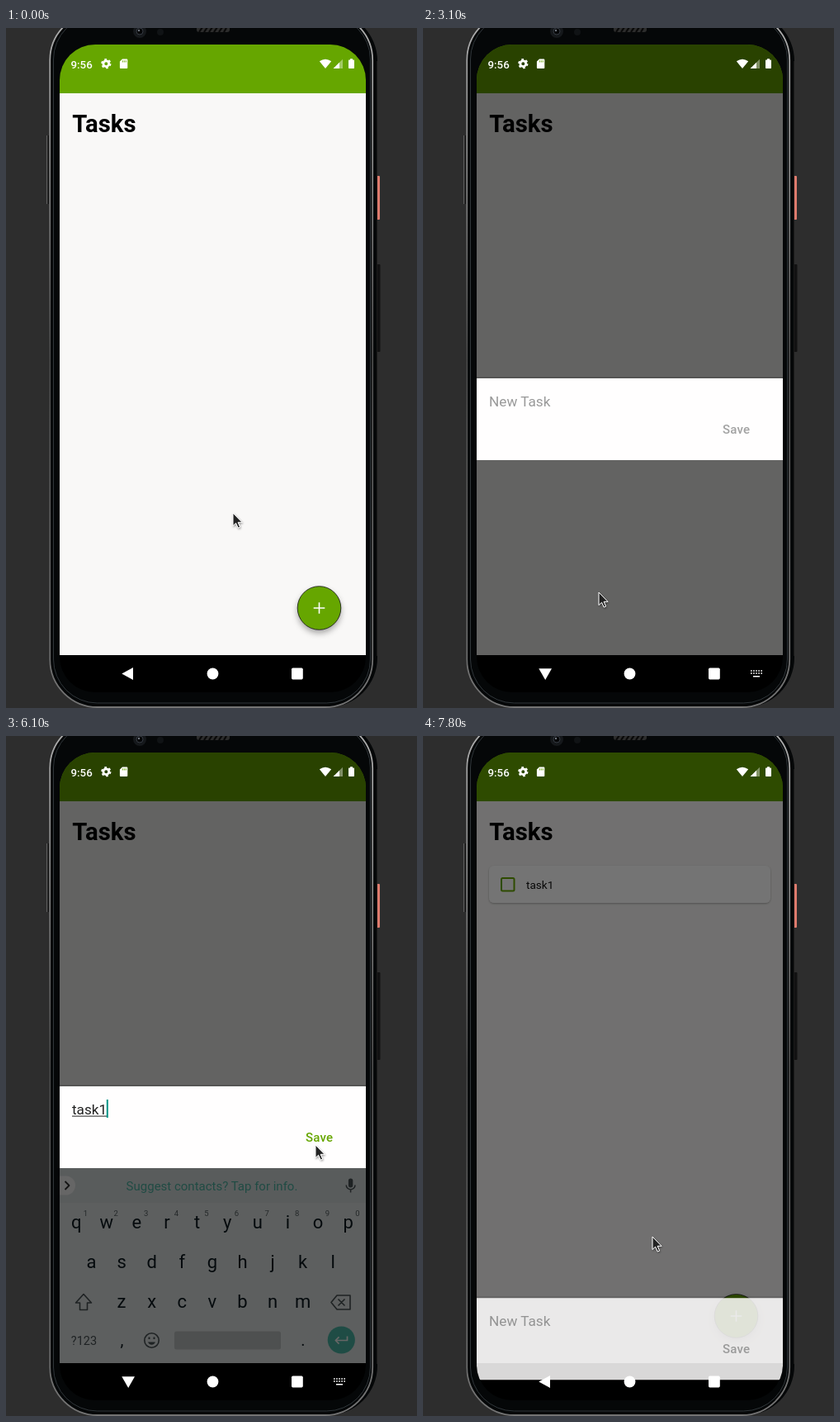
These frames come from a looping animation (498x823 px, 8000 ms). An HTML page:

```html
<!DOCTYPE html>
<html lang="en">
<head>
<meta charset="utf-8">
<title>Task list</title>
<style>
html, body { margin: 0; width: 100%; height: 100%; overflow: hidden; background: #2d2d2d; }
svg { display: block; width: 100%; height: 100%; font-family: Roboto, sans-serif; }
.mid { text-anchor: middle; }
.line { fill: none; stroke-linejoin: round; }
</style>
</head>
<body>
<svg viewBox="0 0 498 823" xmlns="http://www.w3.org/2000/svg">
  <defs>
    <clipPath id="screenClip"><rect x="65" y="20" width="371" height="784" rx="43"/></clipPath>
    <clipPath id="chipClip"><rect x="65" y="523" width="371" height="236"/></clipPath>
    <linearGradient id="metal" x1="0" y1="0" x2="0" y2="1">
      <stop offset="0" stop-color="#b0b0b0"/><stop offset=".25" stop-color="#808080"/>
      <stop offset=".5" stop-color="#4c4c4c"/><stop offset="1" stop-color="#747474"/>
    </linearGradient>
    <filter id="fabShadow" x="-30%" y="-30%" width="160%" height="170%">
      <feDropShadow dx="0" dy="4" stdDeviation="3.5" flood-opacity=".32"/>
    </filter>
    <filter id="cardShadow" x="-5%" y="-20%" width="110%" height="150%">
      <feDropShadow dx="0" dy="1" stdDeviation="1.3" flood-opacity=".3"/>
    </filter>
    <filter id="cursorShadow" x="-40%" y="-30%" width="200%" height="180%">
      <feDropShadow dx=".7" dy="1.3" stdDeviation=".9" flood-opacity=".4"/>
    </filter>
  </defs>

  <!-- Phone body -->
  <rect x="49" y="130" width="3" height="83" fill="#151515"/>
  <path d="M49.7 130V213" stroke="#707070"/>
  <rect x="449" y="179" width="4" height="53" rx="1" fill="#de7b6d"/>
  <rect x="449" y="286" width="4.5" height="106" rx="1" fill="#121212"/>
  <rect x="52" y="-20" width="398" height="842" rx="60" fill="#050708"/>
  <rect x="53.2" y="-19" width="391" height="841" rx="58" fill="none" stroke="url(#metal)" stroke-width="1.8"/>
  <rect x="57.5" y="-15" width="384" height="832" rx="53" fill="none" stroke="#30363a"/>
  <rect x="449" y="40" width="1" height="720" fill="#1b1b1b"/>
  <circle cx="162" cy="4" r="8" fill="#15181b"/><circle cx="162" cy="4" r="4" fill="#050607" stroke="#353a42"/>
  <circle cx="161" cy="3" r="1.2" fill="#717780"/><circle cx="187" cy="5" r="4" fill="#101315"/>
  <rect x="231" y="-3" width="40" height="8" rx="3" fill="#2c2c2c"/>
  <path d="M234 5l4-6m2 6l4-6m2 6l4-6m2 6l4-6m2 6l4-6m2 6l3-5" stroke="#090909" stroke-width="2.2"/>

  <g clip-path="url(#screenClip)">
    <rect x="65" y="20" width="371" height="784"/>
    <rect x="65" y="79" width="371" height="680" fill="#f9f8f7"/>
    <rect x="65" y="20" width="371" height="59" fill="#66a600"/>
    <text x="80.3" y="126" font-size="29.3" font-weight="700">Tasks</text>
    <g id="card">
      <rect x="80" y="157" width="341" height="45" rx="6" fill="#fff" filter="url(#cardShadow)"/>
      <rect x="95" y="172" width="15.5" height="15.5" rx="1.5" fill="none" stroke="#66a600" stroke-width="2"/>
      <text x="125" y="185" font-size="13.6" fill="#111">task1</text>
    </g>
    <g id="fab">
      <circle cx="379.5" cy="702" r="26.3" fill="#66a600" stroke="#111" stroke-width=".8" filter="url(#fabShadow)"/>
      <circle id="ripple" cx="379.5" cy="702" r="26" fill="#000"/>
      <path d="M372.7 702h13.6M379.5 695.2v13.6" stroke="#fff" stroke-width="1.6"/>
    </g>
    <rect id="scrim" x="65" y="20" width="371" height="739"/>

    <g id="sheet">
      <rect x="65" y="-2" width="371" height="2" fill="#000" opacity=".14"/>
      <rect x="65" width="371" height="99" fill="#fffefe"/>
      <text id="entry" x="80" y="33.7" font-size="17.2"></text>
      <rect id="underline" x="80" y="35.6" height="1" fill="#222"/>
      <rect id="caret" y="16" width="2" height="22" fill="#009688"/>
      <text id="save" class="mid" x="379.6" y="67.2" font-size="15" font-weight="500" letter-spacing=".2">Save</text>
    </g>

    <g id="keyboard" clip-path="url(#chipClip)">
      <rect x="65" y="523" width="371" height="236" fill="#e9eeee"/>
      <rect x="65" y="523" width="371" height="42" fill="#e0e6e7"/>
      <rect x="50" y="532.5" width="34" height="23" rx="11.5" fill="#fff"/>
      <path class="line" d="M71.5 539l5 5-5 5" stroke="#333" stroke-width="1.8"/>
      <text class="mid" x="249.5" y="549.7" font-size="15" fill="#4fbca9">Suggest contacts? Tap for info.</text>
      <rect x="414.9" y="535.5" width="5.4" height="11" rx="2.7" fill="#4c5558"/>
      <path class="line" d="M412.2 543.5a5.4 5.4 0 0 0 10.8 0M417.6 549v3.5" stroke="#4c5558" stroke-width="1.5"/>
      <g id="keys" class="mid" fill="#0c1a20"></g>
      <g class="line" stroke="#4c5558" stroke-width="1.6">
        <path d="M94 675.5L84.5 686h5v8.5h9V686h5z"/>
        <path d="M401 677h16v17h-16l-7-8.5zM402.5 681.5l8 8m0-8l-8 8"/>
        <circle cx="176.5" cy="731.5" r="8.7"/>
        <path d="M172 733.5a4.8 4.8 0 0 0 9 0z" fill="#4c5558" stroke="none"/>
        <path d="M173.5 727.5v2.6m6-2.6v2.6" stroke-width="2"/>
      </g>
      <rect x="204" y="720.5" width="129" height="22" rx="2.5" fill="#c5c9ca"/>
      <circle cx="406.3" cy="731" r="16.6" fill="#4fbfac"/>
      <path class="line" d="M413.5 726.5v5h-14m4-4.2l-4.2 4.2 4.2 4.2" stroke="#fff" stroke-width="1.7"/>
      <rect id="keyDim" x="65" y="523" width="371" height="236"/>
    </g>

    <!-- Status bar -->
    <g fill="#fff">
      <text x="78.5" y="48.6" font-size="13.3" font-weight="500">9:56</text>
      <circle cx="121.3" cy="43.2" r="3.4" fill="none" stroke="#fff" stroke-width="2.8"/>
      <circle cx="121.3" cy="43.2" r="5.2" fill="none" stroke="#fff" stroke-width="1.9" stroke-dasharray="2.7 2.745"/>
      <path d="M141 37.5h5.4a.9.9 0 0 1 .9.9v9.7a.9.9 0 0 1-.9.9h-7.6a.9.9 0 0 1-.9-.9v-7.6z"/>
      <path d="M141.3 39.3v2.2m2 -2.2v2.2m2-2.2v2.2" stroke="#66a600" stroke-width=".9"/>
      <path d="M379.8 40.2q7.2-5 14.4 0L387 49z"/>
      <path d="M408 37.7V49h-11.4z" opacity=".4"/>
      <path d="M404 41.7V49h-7.4z"/>
      <path d="M417 37.2h3v1.3h1.2a.8.8 0 0 1 .8.8v9a.8.8 0 0 1-.8.8h-5.4a.8.8 0 0 1-.8-.8v-9a.8.8 0 0 1 .8-.8h1.2z"/>
    </g>

    <!-- Navigation bar -->
    <g fill="#fff">
      <path id="back" d="M140.3 781.5L154 774v15z"/>
      <circle cx="250.5" cy="781.5" r="6.9"/>
      <rect x="346" y="774.6" width="13.8" height="13.8" rx="1.6"/>
      <g id="down">
        <path d="M140.3 775.3h15.7l-7.8 13.6z"/>
        <path d="M397 778h14M397 781h14" stroke="#fff" stroke-width="1.7" stroke-dasharray="1.7 1.38"/>
        <path d="M400 784.7h8" stroke="#fff" stroke-width="1.6"/>
      </g>
    </g>
  </g>
  <path id="cursor" d="M0 0V15.5L3.6 12.2 6.2 18 8.6 17 6.1 11.3H11z" fill="#222" stroke="#fff" stroke-width="1" filter="url(#cursorShadow)"/>
</svg>
<script>
const LOOP = 8000, STEP = 100;
const el = Object.fromEntries([...document.querySelectorAll('[id]')].map(n => [n.id, n]));

// Tracks are lists of [time, ...values], joined by straight lines.
const mouse = [
  [0, 275, 587], [300, 325, 634], [500, 382, 694], [600, 391, 702],
  [2000, 391, 702], [2200, 310, 688], [2400, 220, 673], [2500, 220, 673], [2700, 213, 683],
  [5100, 213, 683], [5300, 300, 729], [5400, 380, 715], [5500, 421, 650],
  [5600, 413, 570], [5700, 386, 515], [5800, 375, 495],
  [6500, 375, 495], [6900, 377, 580], [7200, 371, 677], [7400, 368, 699],
  [7600, 368, 699], [7800, 278, 606]
];
const sheetShow = [
  [1300, 0], [1400, .17], [1500, .5], [1600, .85], [1700, 1],
  [6100, 1], [6200, .8], [6300, 0], [7600, 0], [7700, .45], [7800, .85]
];
const press = [
  [800, 0], [1000, .1], [1200, .1], [1400, 0], [7300, 0], [7500, .1], [7600, .1], [7800, 0]
];
const keyShade = [[3200, .3], [3300, 0], [5900, 0], [6000, .3], [6100, .6]];
const typed = [[0, ''], [3600, 'ta'], [3700, 'tas'], [4100, 'task'], [5000, 'task1'], [6300, '']];

function at(track, t) {
  const i = track.findIndex(k => k[0] > t);
  if (i < 0) return track[track.length - 1].slice(1);
  if (i === 0) return track[0].slice(1);
  const a = track[i - 1], b = track[i], f = (t - a[0]) / (b[0] - a[0]);
  return a.slice(1).map((v, n) => v + (b[n + 1] - v) * f);
}
const show = (node, on) => node.setAttribute('visibility', on ? 'visible' : 'hidden');
const move = (node, x, y) => node.setAttribute('transform', `translate(${x} ${y})`);

function addKey(label, x, y, size, fill) {
  const key = document.createElementNS('http://www.w3.org/2000/svg', 'text');
  const attrs = { x, y, 'font-size': size };
  if (fill) attrs.fill = fill;
  for (const name in attrs) key.setAttribute(name, attrs[name]);
  key.textContent = label;
  el.keys.append(key);
}
[['qwertyuiop', 85.2, 596.3], ['asdfghjkl', 103.5, 643.7], ['zxcvbnm', 140, 691.5]].forEach(([row, x, y], r) =>
  [...row].forEach((letter, i) => {
    addKey(letter, x + i * 36.6, y, 22);
    if (r === 0) addKey((i + 1) % 10, x + 11.3 + i * 36.6, 581, 9.5, '#5b6467');
  }));
addKey('?123', 94.5, 736.7, 14.5, '#4c5558');
addKey(',', 140.5, 738, 20);
addKey('.', 360, 738, 20);

function draw(t) {
  const [x, y] = at(mouse, t);
  const [open] = at(sheetShow, t);
  const lift = t >= 3100 && t < 6200 ? 236 : 0;
  move(el.cursor, x, y);
  move(el.fab, 0, -lift);
  move(el.sheet, 0, 660 - lift + 135 * (1 - open));
  el.sheet.setAttribute('opacity', open);
  el.scrim.setAttribute('opacity', .6 * open ** .6);
  el.ripple.setAttribute('opacity', at(press, t)[0]);

  const [since, text] = typed.filter(k => k[0] <= t).pop();
  const blinkFrom = since >= 3600 ? since : 3300;
  const caretOn = t >= 3300 && t < 6200 && Math.floor((t - blinkFrom) / 550) % 2 === 0;
  el.entry.textContent = text || 'New Task';
  el.entry.setAttribute('fill', text ? '#222' : '#999');
  el.save.setAttribute('fill', text ? '#66a600' : '#a2a2a2');
  const width = text ? el.entry.getComputedTextLength() : 0;
  el.underline.setAttribute('width', width);
  el.caret.setAttribute('x', 80 + width - (text ? .4 : 0));
  show(el.caret, caretOn || (t >= 6000 && t < 6200));

  show(el.keyboard, t >= 3200 && t < 6200);
  el.keyDim.setAttribute('opacity', at(keyShade, t)[0]);
  const typing = t >= 2900 && t < 6200;
  show(el.back, !typing);
  show(el.down, typing);
  show(el.card, t >= 6200);
}

const start = performance.now();
function tick() {
  const t = (performance.now() - start) % LOOP;
  draw(Math.floor(t / STEP) * STEP);
  requestAnimationFrame(tick);
}
tick();
</script>
</body>
</html>
```
